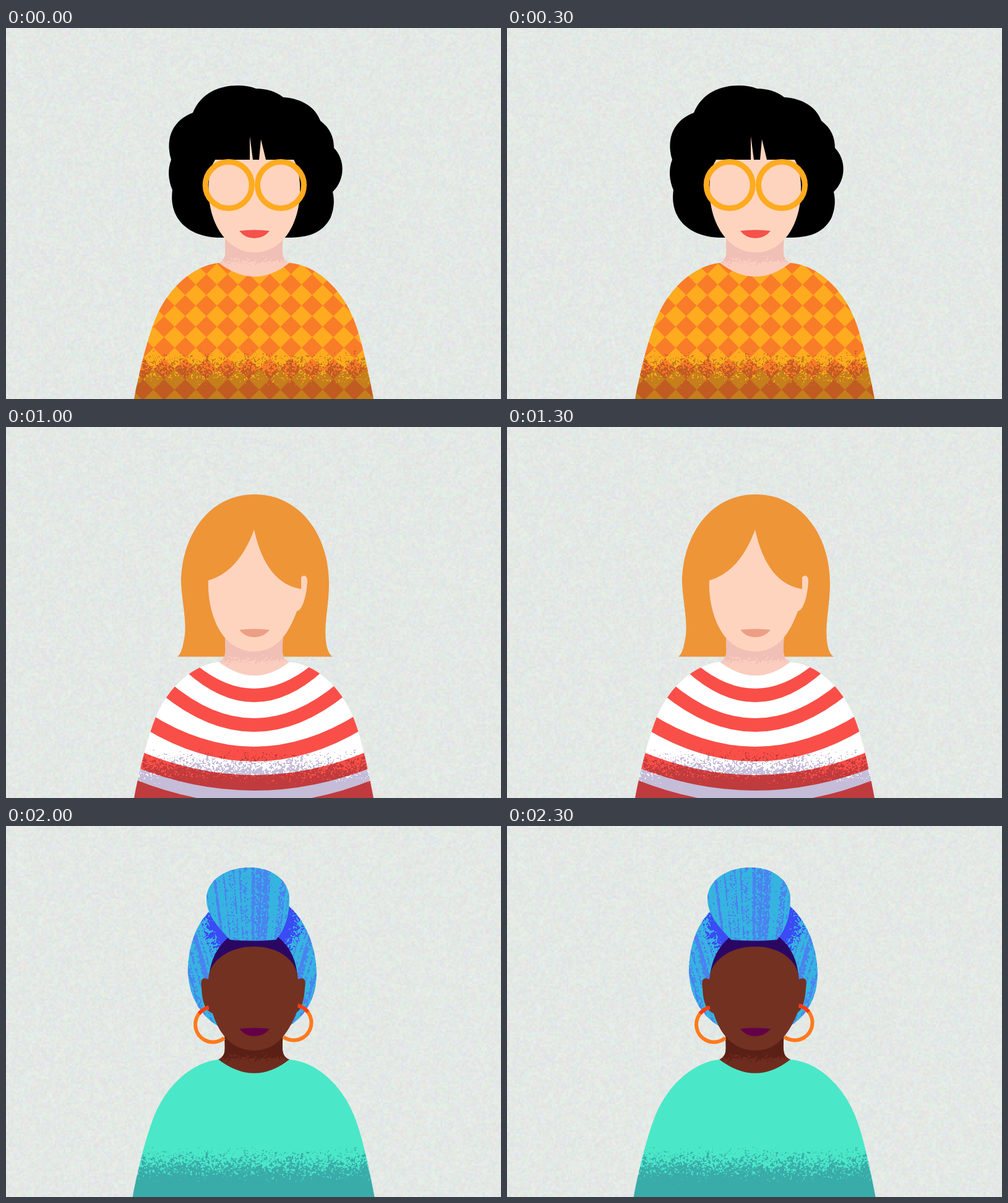
Write an HTML page with a canvas that moves like this. It is 800 px wide and 600 px high and loops after 2500 ms.

```html
<!DOCTYPE html>
<html lang="en">
<head>
<meta charset="utf-8">
<title>Portraits</title>
<style>
  html, body { margin: 0; width: 100%; height: 100%; overflow: hidden; background: #e2e7e4; }
  canvas { display: block; }
</style>
</head>
<body>
<canvas id="stage" width="800" height="600"></canvas>
<script>
const W = 800, H = 600, HOLD = 500;
const BODY = new Path2D('M344 380C305 384 264 417 242 469C232 494 219 538 207 600L205 612H597L594 600C582 536 572 496 561 469C541 420 500 383 458 380Q402 424 344 380Z');
const NECK = new Path2D('M354 335C354 365 358 372 344 380Q402 426 458 380C445 374 446 365 448 335Z');
const LIPS = new Path2D('M377 328Q401 325 426 328Q417 340 401 340Q386 340 377 328Z');
const JAW = 'C458 330 440 363 402 363';

let g; // context of the portrait being drawn

function makeCanvas(w = W, h = H) {
  const c = document.createElement('canvas');
  c.width = w;
  c.height = h;
  return c;
}

// Repeatable random value and smooth noise, both 0..1
function rand(x, y) {
  const s = Math.sin(x * 127.1 + y * 311.7) * 43758.5453;
  return s - Math.floor(s);
}
function noise(x, y) {
  const i = Math.floor(x), j = Math.floor(y), u = x - i, v = y - j;
  const top = rand(i, j) * (1 - u) + rand(i + 1, j) * u;
  const low = rand(i, j + 1) * (1 - u) + rand(i + 1, j + 1) * u;
  return top * (1 - v) + low * v;
}

function fill(path, color) {
  g.fillStyle = color;
  g.fill(typeof path === 'string' ? new Path2D(path) : path);
}
function line(path, color, width) {
  g.strokeStyle = color;
  g.lineWidth = width;
  g.lineCap = 'round';
  g.stroke(new Path2D(path));
}
function arc(x, y, r, from, to, color, width, back = false) {
  g.beginPath();
  g.arc(x, y, r, from * Math.PI / 180, to * Math.PI / 180, back);
  g.strokeStyle = color;
  g.lineWidth = width;
  g.lineCap = 'butt';
  g.stroke();
}
function dot(x, y, r, color) {
  g.beginPath();
  g.arc(x, y, r, 0, 7);
  g.fillStyle = color;
  g.fill();
}

// Grain inside a path; density(x, y) is the share of covered area
function speckle(path, color, [x0, y0, x1, y1], density, blend = 'source-over') {
  const layer = makeCanvas(x1 - x0, y1 - y0), l = layer.getContext('2d');
  l.fillStyle = color;
  for (let y = y0; y < y1; y++)
    for (let x = x0; x < x1; x++)
      if (noise(x / 1.8, y / 1.8) < density(x, y)) l.fillRect(x - x0, y - y0, 1, 1);
  g.save();
  g.clip(path);
  g.globalCompositeOperation = blend;
  g.drawImage(layer, x0, y0);
  g.restore();
}

function backdrop() {
  const w = 267, h = 200, c = makeCanvas(w, h), l = c.getContext('2d');
  const img = l.createImageData(w, h), base = [228, 233, 230];
  for (let i = 0; i < w * h; i++) {
    for (let k = 0; k < 3; k++)
      img.data[i * 4 + k] = base[k] + (rand(i % w, Math.floor(i / w) + k * 271) - .5) * 16;
    img.data[i * 4 + 3] = 255;
  }
  l.putImageData(img, 0, 0);
  g.drawImage(c, 0, 0, w * 3, h * 3);
}

function diamonds() {
  const d = 17.1;
  g.beginPath();
  for (let y = 381; y < 620; y += 34)
    for (let x = 187; x < 620; x += 2 * d) {
      g.moveTo(x, y - 17);
      g.lineTo(x + d, y);
      g.lineTo(x, y + 17);
      g.lineTo(x - d, y);
      g.closePath();
    }
  g.fillStyle = '#f97c28';
  g.fill();
}

// Each arc: half width, height at its ends, height in the middle
function stripes() {
  const arcs = [[88, 389, 423], [105, 400, 445], [128, 420, 471], [142, 438, 493], [160, 469, 517],
    [168, 493, 541], [178, 527, 563], [184, 553, 588], [188, 572, 609], [194, 600, 640]]
    .map(([w, end, mid]) => [w * 1.06, mid - (mid - end) * 1.1236, mid]);
  for (let i = 0; i < arcs.length; i += 2) {
    const [w, e, m] = arcs[i], [v, f, n] = arcs[i + 1];
    fill(`M${401 - w} ${e}Q401 ${2 * m - e} ${401 + w} ${e}L${401 + v} ${f}Q401 ${2 * n - f} ${401 - v} ${f}Z`, '#f94f48');
  }
}

function pills() {
  [411, 444, 471, 505, 532, 566].forEach((y, row) => {
    for (let i = 0; i < 8; i++) {
      const x = (row % 2 ? 239.5 : 267) + 43.6 * i, s = i % 2 ? 8 : -8;
      line(`M${x - 8} ${y - s}L${x + 8} ${y + s}`, '#f8821f', 10.5);
    }
  });
}

function bust(p) {
  g.save();
  if (p.plain) g.transform(1.008, 0, 0, 1, -3.6, -2.2);
  fill(NECK, p.neck);
  speckle(NECK, p.neckShade, [340, 330, 462, 390], (x, y) => (387 - y) / 20);
  fill(BODY, p.top);
  g.save();
  g.clip(BODY);
  if (p.pattern) p.pattern();
  g.restore();
  speckle(BODY, '#c5bcd8', [200, 508, 604, 612], (x, y) => (y - 514) / 68, 'multiply');
  g.restore();
}

function turban() {
  const wrap = new Path2D('M340 128C310 150 294 190 294 236C296 280 318 310 345 325H455C490 305 502 270 502 236C500 190 482 150 455 128Z');
  const knot = new Path2D('M362 184C345 165 324 145 324 118C324 88 355 67 394 67C430 67 458 88 458 118C458 145 450 170 436 184Q400 187 362 184Z');
  const box = [290, 60, 506, 330];
  const streak = u => (noise(u / 2.2, 7) - .3) * 1.2;
  fill(wrap, '#36b4e0');
  speckle(wrap, '#4a82f0', box, (x, y) => streak(Math.abs(x - 398) + (y - 180) * .3) + .1);
  speckle(wrap, '#3b4bf6', box, (x, y) => (92 - Math.hypot(x - 398, y - 150)) / 36);
  fill('M328 242C332 210 345 192 362 178H438C455 192 468 210 471 242Z', '#2b0763');
  fill(knot, '#36b4e0');
  speckle(knot, '#4a82f0', box, (x, y) => {
    const u = (x - 398) / (1 + (y < 185 ? 185 - y : 0) / 350);
    return streak(u + 300) + (Math.abs(u - 4) < 15 ? .35 : 0);
  });
}

const people = [
  {
    top: '#ffab1f', neck: '#facdbf', neckShade: '#f0bfb5', skin: '#ffd4be', lips: '#f4524b', pattern: diamonds,
    hair() {
      fill('M302 137C315 105 345 93 374 93Q392 93 404 98Q430 98 448 112C478 114 500 128 508 150C524 162 530 177 530 194C548 212 549 245 528 265C532 282 529 296 524 308C510 332 490 339 453 339H352C300 341 262 312 269 262C262 246 261 228 267 213C256 176 272 148 302 137Z', '#000');
    },
    face: 'M338 213H394V175L399 213H409L412 180L420 213H465C472 225 476 245 475 265C474 320 445 363 402 363C355 363 322 310 328 245Q330 225 338 213Z',
    extras() {
      for (const x of [359.7, 444]) arc(x, 254, 37.5, 0, 360, '#ffab1f', 9);
    }
  },
  {
    top: '#086295', neck: '#ffcfbd', neckShade: '#efc0b6', skin: '#ffdec6', lips: '#f76e4a', plain: true,
    hair() {
      fill('M380 125C340 126 295 165 296 232Q297 255 302 270C305 305 325 338 352 348H447C485 332 508 282 492 232C503 195 495 120 408 120Q393 120 380 125Z', '#f96b4b');
    },
    face: 'M326 255Q392 236 407 171Q404 215 380 245Q430 230 428 174Q463 191 472 244C476 237 487 238 486 250C486 270 480 294 472 296L470 298C458 330 440 362 402 362C342 362 324 300 326 255Z'
  },
  {
    top: '#fff', neck: '#facdbf', neckShade: '#f0bfb5', skin: '#ffd4be', lips: '#ec9f84', pattern: stripes,
    hair() {
      fill('M402 109C325 109 283 180 283 252C285 290 294 320 287 348Q284 366 277 371.5H528Q519 366 517 345C514 315 522 290 522 252C522 175 475 109 402 109Z', '#ee9538');
    },
    face: `M327 248Q376 234 401 166Q420 253 477 262V243C480 239 487 239 487 249C486 270 480 294 472 297L470 298${JAW}C342 363 325 290 327 248Z`
  },
  {
    top: '#de2185', neck: '#9a5842', neckShade: '#834a3b', skin: '#9e5c45', lips: '#6f3123', pattern: pills,
    hair() {
      fill('M357 126C345 112 330 98 330 78C330 50 358 31 395 31C430 31 451 50 451 78C451 98 444 115 437 126Z', '#000');
      fill('M285 230A110 99 0 0 1 505 230A110 99 0 0 1 285 230Z', '#000');
      line('M359 130Q398 125 435 130', '#5560c9', 8);
    },
    face: `M330 257Q377 240 405 188Q426 231 471 255C472 241 487 239 486 254C486 272 480 294 472 296L470 298${JAW}C366 363 345 338 334 302C322 296 316 275 315 255C314 240 329 240 330 257Z`,
    extras() {
      const gold = '#e97b2c';
      dot(329.5, 298, 5, gold);
      fill('M329 299C322 312 311 325 311 336Q313 346 322 346Q331 346 333 336C335 325 333 312 329 299Z', gold);
      dot(474.5, 295, 5, gold);
      fill('M475 297C470 312 467 322 467 332Q468 343 478 343Q488 343 489 333C488 322 480 308 475 297Z', gold);
    }
  },
  {
    top: '#4ae8c8', neck: '#6e2c1e', neckShade: '#5a2015', skin: '#733122', lips: '#640048', plain: true,
    hair: turban,
    face: `M328 240C335 213 365 195 401 195C437 195 465 213 471 240L472 248C483 243 485 250 483 262C482 280 478 297 470 301${JAW}C366 363 345 338 334 303C322 298 317 285 316 262C314 250 316 243 327 248Z`,
    extras() {
      const hoop = '#fd7a1c', red = '#fa3c14';
      arc(334.5, 321, 28.5, -104, 50, hoop, 6, true);
      arc(334.5, 321, 28.5, -104, -142, red, 6, true);
      arc(465, 318, 28.5, -76, 126, hoop, 6);
      arc(465, 318, 28.5, -76, -37, red, 6);
    }
  }
];

const portraits = people.map(p => {
  const c = makeCanvas();
  g = c.getContext('2d');
  backdrop();
  p.hair();
  bust(p);
  fill(p.face, p.skin);
  fill(LIPS, p.lips);
  if (p.extras) p.extras();
  return c;
});

const stage = document.getElementById('stage').getContext('2d');
function tick() {
  const i = Math.floor(performance.now() / HOLD) % portraits.length;
  stage.drawImage(portraits[i], 0, 0);
  requestAnimationFrame(tick);
}
tick();
</script>
</body>
</html>
```
